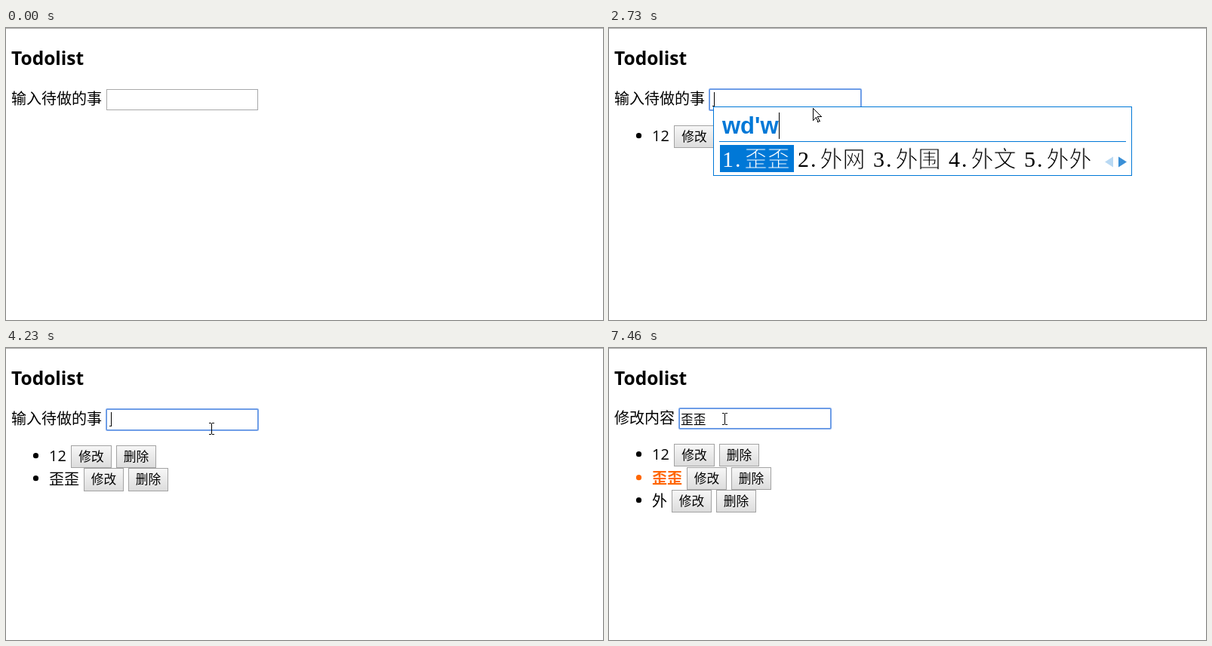
An HTML page for the animation above (7990 ms loop, 791x387 px).

```html
<!DOCTYPE html>
<html lang="zh-CN">
<head>
<meta charset="utf-8">
<title>Todolist</title>
<style>
html, body { margin: 0; width: 100%; height: 100%; overflow: hidden; background: #fff; }
svg { display: block; width: 791px; height: 387px; }
text { font: 20px "Open Sans", "Noto Sans CJK SC", "Noto Sans CJK", sans-serif; white-space: pre; }
.title { font-size: 24.5px; font-weight: 700; }
.small { font-size: 16.67px; }
.active { font-weight: 700; fill: #f60; }
.pinyin { font: 700 31px "Liberation Sans", sans-serif; fill: #0078d7; }
.cand { font: 300 30px "Liberation Serif", "Noto Sans CJK SC", "Noto Sans CJK", serif; }
.cand tspan { stroke-width: .9px; }
</style>
</head>
<body>
<svg viewBox="0 0 791 387">
  <defs>
    <linearGradient id="up" x2="0" y2="1"><stop stop-color="#f7f7f7"/><stop offset="1" stop-color="#dcdcdc"/></linearGradient>
    <linearGradient id="down" x2="0" y2="1"><stop stop-color="#dcdcdc"/><stop offset="1" stop-color="#f0f0f0"/></linearGradient>
  </defs>
  <path d="M0 .5H791" stroke="#aaa"/>
  <text class="title" x="7" y="49">Todolist</text>
  <g id="view"></g>
</svg>
<script>
const LOOP = 7990, STEP = 70;
const FOCUS = 520, PRESS = 5830, EDIT = 5970, REFOCUS = 6950;
const view = document.getElementById('view');

// name, time added, x of both buttons, width of the first
const items = [
  ['12', 2000, 86, 146, 54],
  ['歪歪', 3550, 103, 162, 53],
  ['外', 4660, 83, 142, 53]
];
const rowY = [129, 159, 190], editY = [127, 158, 188];

// time, field text, caret offset (-1 = hidden)
const field = [
  [0, '', -1], [FOCUS, '', 0], [1050, '', -1], [1330, '1', 8], [1470, '12', 18],
  [2000, '', 0], [2350, '', 4], [3260, '歪歪', 33], [3550, '', 0],
  [3840, '', 4], [4300, '外', 17], [4660, '', 0], [5190, '', -1],
  [5720, '', 0], [PRESS, '', -1], [EDIT, '歪歪', -1], [REFOCUS, '歪歪', 32], [7460, '歪歪', -1]
];

// time, typed keys, caret x, candidates
const singleW = '我 为 无 问 玩', singleWd = '外 歪 崴 呙 喎';
const ime = [
  [0], [2420, 'w', 174, singleW], [2560, 'wd', 193, singleWd],
  [2730, "wd'w", 225, '歪歪 外网 外围 外文 外外'],
  [2910, "wd'wd", 244, '歪歪 外外 歪歪扭扭 外带 歪歪斜斜'],
  [3190], [3910, 'w', 174, singleW], [3980, 'wd', 193, singleWd], [4230]
];

// start, end, from, control, to
const moves = [
  [70, 490, [395, 66], [330, 78], [272, 107]],
  [5260, 5660, [272, 107], [225, 160], [148, 180]],
  [6040, 6740, [148, 180], [334, 150], [153, 94]]
];

const last = (list, t) => list.filter(e => e[0] <= t).pop();
const inside = ([px, py], x, y, w, h) => px >= x && px < x + w && py >= y && py < y + h;
const rect = (x, y, w, h, attrs) => `<rect x="${x}" y="${y}" width="${w}" height="${h}" ${attrs}/>`;
const frame = (x, y, w, h, attrs) => rect(x + .5, y + .5, w - 1, h - 1, attrs);
const label = (x, y, s, cls = '') => `<text class="${cls}" x="${x}" y="${y}">${s}</text>`;

function pointer(t) {
  const m = last(moves, t);
  if (!m) return null;
  const [start, end, a, b, c] = m;
  const held = Math.floor((t - start) / STEP) * STEP;
  const p = Math.min(1, held / (end - start - (end - start) % STEP));
  const u = p * p * (3 - 2 * p), v = 1 - u;
  return a.map((n, i) => Math.round(v * v * n + 2 * u * v * b[i] + u * u * c[i]));
}

function drawField(t, edit) {
  const x = edit ? 93 : 133, y = edit ? 80 : 81, h = edit ? 27 : 28;
  const [, text, caret] = last(field, t);
  const focused = t >= FOCUS && t < PRESS || t >= REFOCUS;
  let out = label(7, edit ? 99.6 : 100.6, edit ? '修改内容' : '输入待做的事');
  out += focused
    ? frame(x - 1, y - 1, 203, h + 2, 'rx="1" fill="#fff" stroke="#7ba6ea"') +
      frame(x, y, 201, h, 'fill="#fff" stroke="#6295e4"')
    : frame(x, y, 201, h, 'fill="#fff" stroke="#a9a9a9"');
  if (text) out += label(x + 2, 101, text, 'small');
  if (caret >= 0) out += rect(x + 2 + caret, 85, caret ? 1 : 2, 19, '');
  if (caret === 4) out += rect(x + 4, 103, 3, 1, '');
  return out;
}

function drawButton(x, y, w, h, s, pos, pressed) {
  const over = pos && inside(pos, x, y, w, h);
  const fill = over && pressed ? 'down' : 'up';
  return frame(x, y, w, h, `fill="url(#${fill})" stroke="${over ? '#747474' : '#a3a3a3'}"`) +
    label(x + w / 2 - 16.67, y + 21.3, s, 'small');
}

function drawItems(t, edit, pos) {
  const pressed = t >= PRESS && t < EDIT;
  return items.map(([name, added, x1, x2, w], i) => {
    if (t < added) return '';
    const y = (edit ? editY : rowY)[i], h = i === 1 && !edit ? 31 : 30;
    const cls = edit && i === 1 ? 'active' : '';
    return `<circle class="${cls}" cx="39.5" cy="${y + 13.7}" r="3.6"/>` +
      label(57, y + (i ? 22 : 21.3), name, cls) +
      drawButton(x1, y, w, h, '修改', pos, pressed) +
      drawButton(x2, y, 53, h, '删除', pos, pressed);
  }).join('');
}

function drawIme([, keys, caretX, list]) {
  let x = 150, cands = '';
  list.split(' ').forEach((word, i) => {
    const w = 30 + word.length * 30;
    const [ink, paper] = i ? ['#000', '#fff'] : ['#fff', '#0078d7'];
    if (!i) cands += rect(147, 155, w + 8, 36, `fill="${paper}"`);
    // a paper-coloured outline thins the strokes
    cands += `<text class="cand" fill="${ink}" x="${x} ${x + 17}" y="184">${i + 1}.` +
      `<tspan x="${x + 29.5}" stroke="${paper}">${word}</tspan></text>`;
    x += w + 10;
  });
  const right = x + 43;
  return frame(138, 104, right - 138, 92, 'fill="#fff" stroke="#0078d7"') +
    label(150, 140, keys, 'pinyin') + rect(caretX, 112, 1, 35, '') +
    rect(146, 150, right - 154, 1, 'fill="#0078d7"') + cands +
    `<path d="M${right - 25} 170.5v14l-11-7z" fill="#b9d9f3"/>` +
    `<path d="M${right - 18} 170.5v14l11-7z" fill="#3a8fd6"/>`;
}

function drawPointer(pos, edit, popup) {
  const [x, y] = pos;
  const beam = !popup && inside(pos, edit ? 93 : 133, edit ? 80 : 81, 201, 28);
  if (beam) {
    return `<path transform="translate(${x} ${y})" fill="none" stroke="#000" ` +
      'd="M-3-7.5h3m1 0h3M.5-7v14M-3 7.5h3m1 0h3"/>';
  }
  const tip = popup ? [x - 2, y - 1] : pos;
  return `<path transform="translate(${tip})" fill="#fff" stroke="#000" shape-rendering="crispEdges" ` +
    'd="M.5.5V16.5L4.5 12.5 7 18.5 9 17.5 6.5 11.5H11.5Z"/>';
}

let shown = '';
function render(now) {
  const t = now % LOOP, edit = t >= EDIT;
  const pos = pointer(t), popup = last(ime, t);
  const open = popup.length > 1;
  const html = drawField(t, edit) + drawItems(t, edit, pos) +
    (open ? drawIme(popup) : '') + (pos ? drawPointer(pos, edit, open) : '');
  if (html !== shown) view.innerHTML = shown = html;
}

const begin = performance.now();
function tick() {
  render(performance.now() - begin);
  requestAnimationFrame(tick);
}
tick();
</script>
</body>
</html>
```
